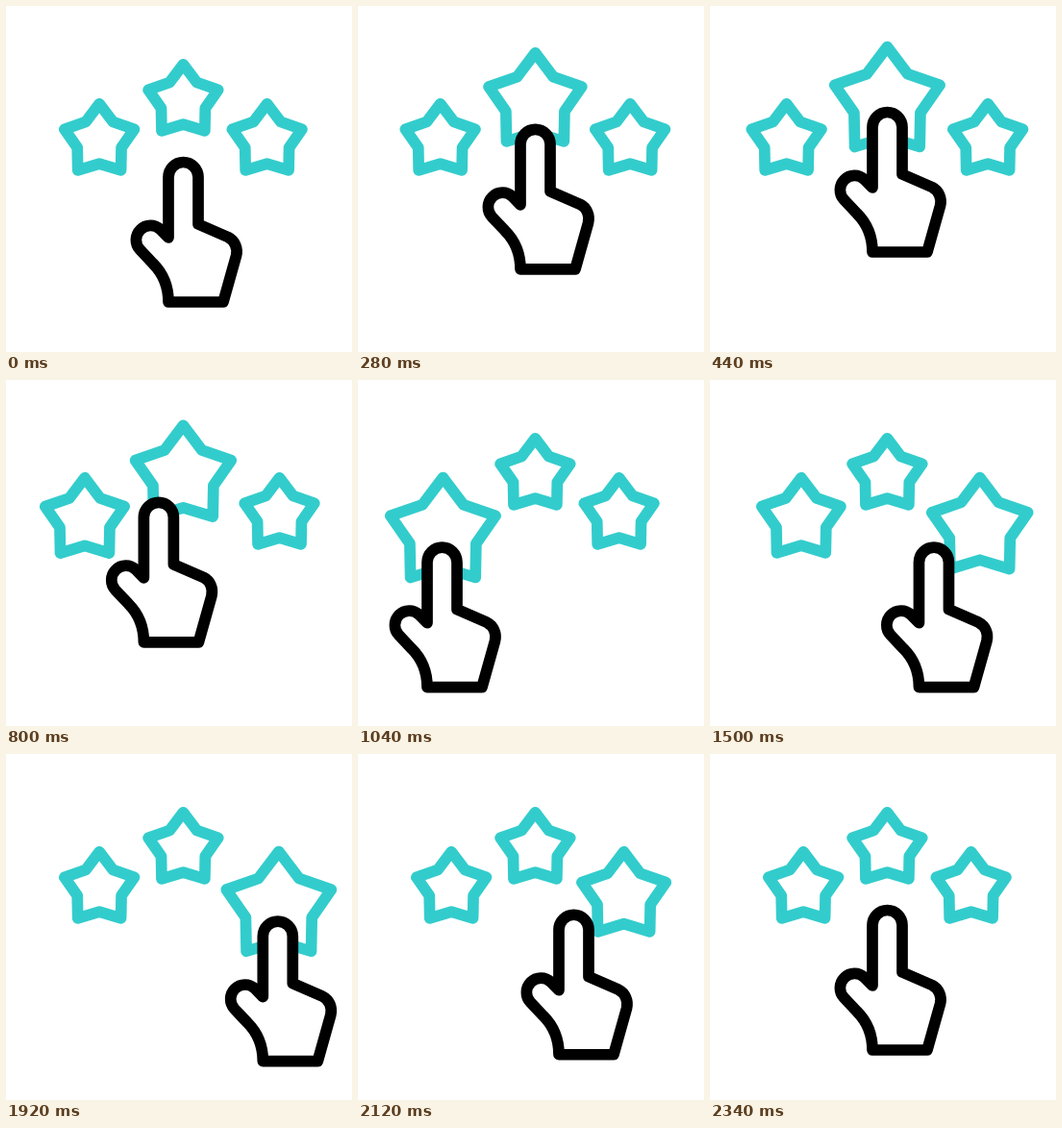
Write an HTML page that moves like this. It is 360 by 360 pixels and loops after 2400 ms.

```html
<!DOCTYPE html>
<html lang="en">
<head>
<meta charset="utf-8">
<title>Star rating</title>
<style>
  html, body { margin: 0; width: 100%; height: 100%; overflow: hidden; background: #fff; }
  svg { display: block; width: 100vw; height: 100vh; }
  path { fill: none; stroke-width: 11.7; stroke-linecap: round; stroke-linejoin: round; }
  .star { stroke: #33cccc; }
  #hand { fill: #fff; stroke: #000; }
</style>
</head>
<body>
<svg viewBox="0 0 360 360">
  <path class="star"/>
  <path class="star"/>
  <path class="star"/>
  <path id="hand" d="M169 241V178A15.5 15.5 0 0 1 200 178V227L231 240.5C238 244 241.5 252 239.5 260L226 308H169C169 292 163 278 153 268L139.4 253.6A15 15 0 0 1 160.6 232.4Z"/>
</svg>
<script>
const LOOP = 2400, STEP = 600, DELAY = 100;
const LEFT = -1, MIDDLE = 0, RIGHT = 1, NONE = null;
const tour = [NONE, MIDDLE, LEFT, RIGHT, NONE];
const stars = document.querySelectorAll('.star');
const hand = document.getElementById('hand');

// Cubic Bezier easing (.33, 0, .52, 1), solved by bisection
function ease(x) {
  if (x <= 0) return 0;
  if (x >= 1) return 1;
  let lo = 0, hi = 1, u;
  for (let i = 0; i < 24; i++) {
    u = (lo + hi) / 2;
    const bx = 0.99 * u * (1 - u) ** 2 + 1.56 * u * u * (1 - u) + u ** 3;
    if (bx < x) lo = u; else hi = u;
  }
  return u * u * (3 - 2 * u);
}

function starPath(cx, cy, scale) {
  const points = Array.from({ length: 10 }, (_, i) => {
    const r = (i % 2 ? 24.1 : 38.2) * scale;
    const a = i * Math.PI / 5;
    return (cx + r * Math.sin(a)).toFixed(2) + ' ' + (cy - r * Math.cos(a)).toFixed(2);
  });
  return 'M' + points.join('L') + 'Z';
}

function draw(t) {
  const step = Math.max(0, Math.floor((t - DELAY) / STEP));
  const from = tour[step], to = tour[step + 1];
  const p = ease((t - DELAY - step * STEP) / (to === NONE ? 440 : 334));
  const pressed = side => (side === from ? 1 - p : 0) + (side === to ? p : 0);

  let handX = 0, handY = 0;
  stars.forEach((star, i) => {
    const side = i - 1, outer = Math.abs(side), w = pressed(side);
    handX += w * (98 * side + outer);
    handY += w * (63.7 * outer - 52);
    // A pressed star grows outwards; the middle one also pushes its neighbours apart
    const x = 184.4 + side * (87.25 + 17.5 * pressed(MIDDLE) * outer) + w * (10.5 * side + 1.75 * outer);
    const y = 99 + 41 * outer + w * (1 + 18 * outer);
    star.setAttribute('d', starPath(x, y, 1 + 0.505 * w));
  });
  hand.setAttribute('transform', `translate(${handX} ${handY})`);
}

const began = performance.now();
function tick() {
  draw((performance.now() - began) % LOOP);
  requestAnimationFrame(tick);
}
tick();
</script>
</body>
</html>
```
